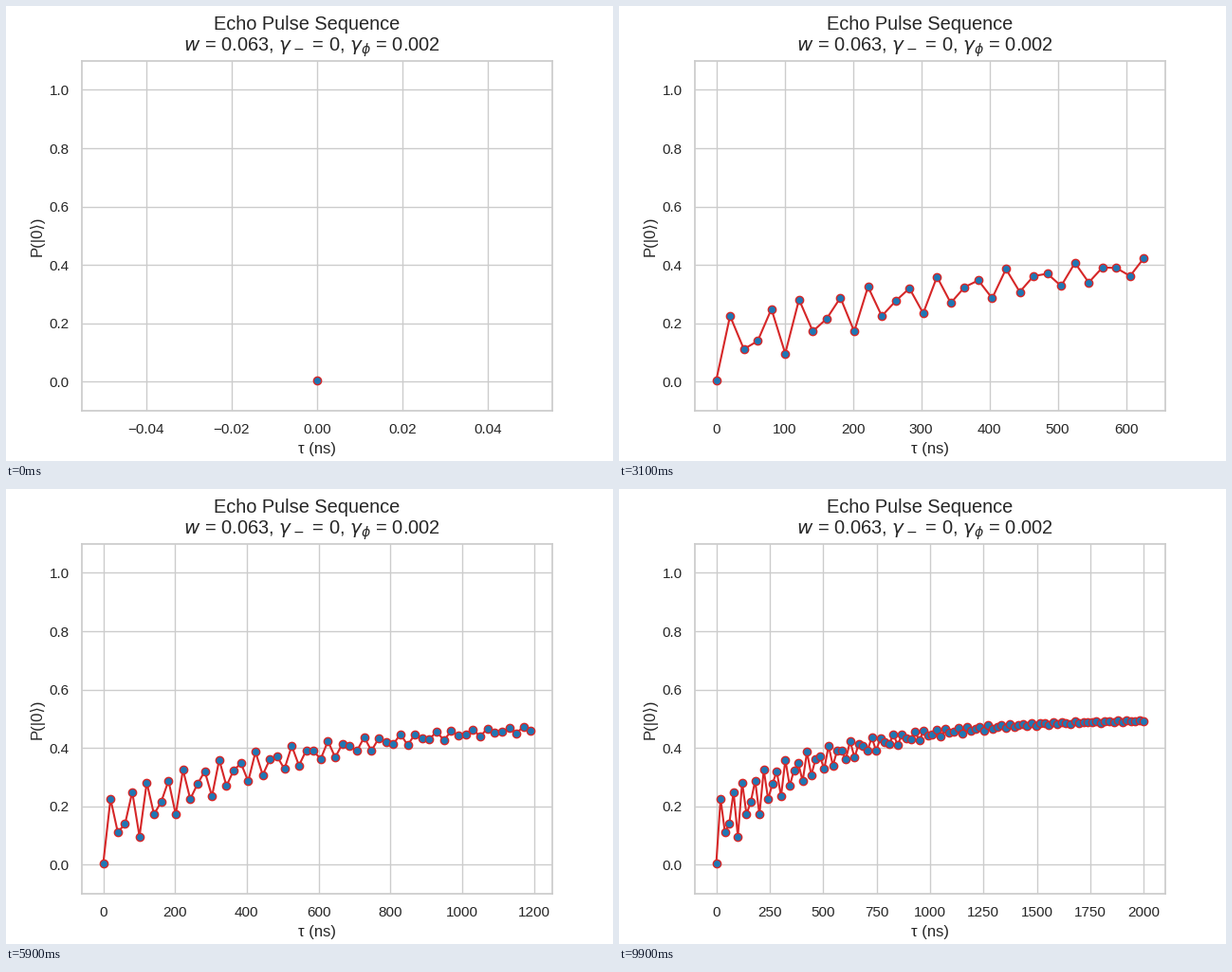
Animation, 640 px wide and 480 px high, one loop 10 s. Source, as a matplotlib script:

```python
import numpy as np
import matplotlib.pyplot as plt
from matplotlib.animation import FuncAnimation

INK, RULE = "0.15", "0.8"
plt.rcParams.update({
    "font.family": ["Liberation Sans", "DejaVu Sans"],
    "text.color": INK,
    "axes.labelcolor": INK,
    "axes.labelsize": 12,
    "axes.edgecolor": RULE,
    "axes.linewidth": 1.25,
    "axes.grid": True,
    "axes.axisbelow": True,
    "grid.color": RULE,
    "grid.linewidth": 1,
    "lines.solid_capstyle": "round",
    "xtick.bottom": False,
    "ytick.left": False,
    "xtick.color": INK,
    "ytick.color": INK,
    "xtick.labelsize": 11,
    "ytick.labelsize": 11,
    "xtick.major.size": 6,
    "ytick.major.size": 6,
})

STEPS = 100
DEPHASING = 0.002
RABI = 2 * np.pi / 100

# Echo signal: decays towards 1/2 with a ripple at twice the Rabi frequency
tau = np.linspace(0, 2000, STEPS)
ripple = 0.38 + 0.1145 * np.cos(2 * RABI * tau)
prob = 0.5 - np.exp(-DEPHASING * tau) * ripple

fig, ax = plt.subplots(figsize=(6.4, 4.8), dpi=100)
fig.suptitle(
    "Echo Pulse Sequence \n"
    rf" $w$ = {RABI:.3f}, $\gamma_-$ = 0, $\gamma_\phi$ = {DEPHASING}",
    fontsize=14.4,
)
ax.set(xlabel="τ (ns)", ylabel="P(|0⟩)", ylim=(-0.1, 1.1))
line, = ax.plot([], [], "o-", color="tab:red", lw=1.5, ms=6,
                mfc="tab:blue", mec="tab:red", mew=1)


def update(i):
    line.set_data(tau[:i + 1], prob[:i + 1])
    ax.relim()
    ax.autoscale_view(scaley=False)
    return line,


anim = FuncAnimation(fig, update, frames=STEPS, interval=100,
                     repeat=True, repeat_delay=0)
plt.show()
```
